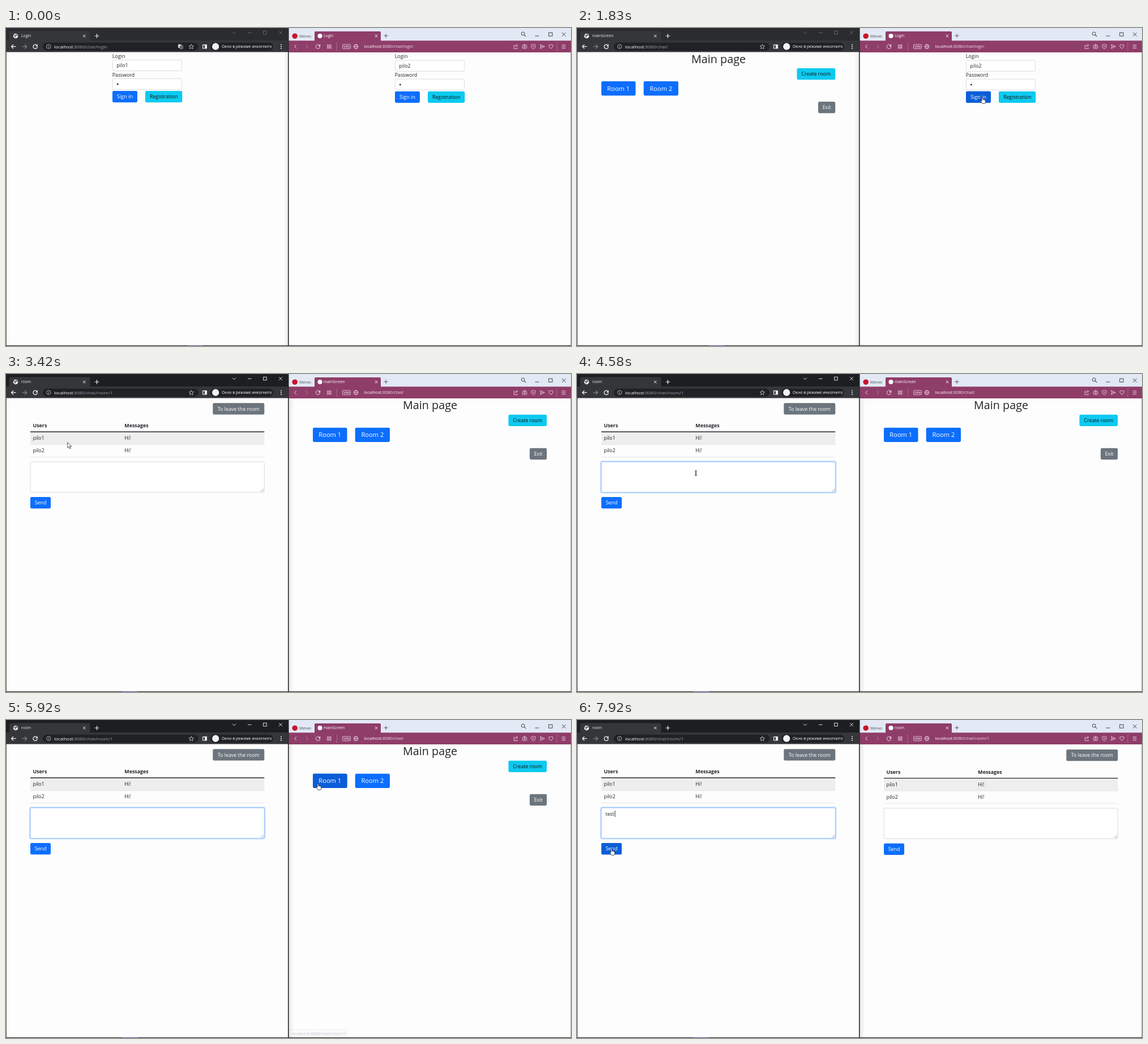
Animation, 998 px wide and 561 px high, one loop 8000 ms. Source, as an HTML page:

```html
<!DOCTYPE html>
<html lang="en">
<head>
<meta charset="utf-8">
<title>Two chat windows</title>
<style>
  html, body { margin: 0; width: 100%; height: 100%; overflow: hidden; background: #fdfdfd; }
  svg { display: block; width: 998px; height: 561px; font-family: "Open Sans", "Noto Sans", sans-serif; }
  text { white-space: pre; }
</style>
</head>
<body>
<svg id="stage" viewBox="0 0 998 561"></svg>
<script>
const LOOP = 8000, STEP = 1000 / 12;
const BLUE = '#0d6efd', CYAN = '#0dcaf0', GREY = '#6c757d', INK = '#212529';
const HOVER = { [BLUE]: '#0b5ed7', [CYAN]: '#31d2f2', [GREY]: '#5c636a' };
const stage = document.getElementById('stage');

// ---- drawing helpers
const rect = (x, y, w, h, fill, r = 0, more = '') =>
  `<rect x="${x}" y="${y}" width="${w}" height="${h}" rx="${r}" fill="${fill}" ${more}/>`;
const text = (x, mid, str, size, fill, more = '') =>
  `<text x="${x}" y="${mid + size * .36}" font-size="${size}" fill="${fill}" ${more}>${str}</text>`;
const line = (d, color, w = 1, more = '') =>
  `<path d="${d}" fill="none" stroke="${color}" stroke-width="${w}" ${more}/>`;
const disc = (x, y, r, fill, more = '') => `<circle cx="${x}" cy="${y}" r="${r}" fill="${fill}" ${more}/>`;
const at = (x, y, body) => `<g transform="translate(${x} ${y})">${body}</g>`;
const cross = (x, y, r, c, w = 1) =>
  line(`M${x - r} ${y - r}l${2 * r} ${2 * r}M${x - r} ${y + r}l${2 * r} ${-2 * r}`, c, w);
const plus = (x, y, r, c, w = 1.2) => line(`M${x - r} ${y}h${2 * r}M${x} ${y - r}v${2 * r}`, c, w);
const arrow = (x, y, c, dir = 1) =>
  line(`M${x - 4 * dir} ${y}h${8 * dir}m${-3.5 * dir} -3.5l${3.5 * dir} 3.5l${-3.5 * dir} 3.5`, c, 1.3);
const reload = (x, y, c, w = 1.3) =>
  line(`M${x + 2.6} ${y - 2.6}A3.7 3.7 0 1 0 ${x + 3.7} ${y + .6}`, c, w) +
  `<path d="M${x + 4.2} ${y - 4.2}v4h-4z" fill="${c}"/>`;
const globe = (x, y, r, c) => disc(x, y, r, 'none', `stroke="${c}" stroke-width=".8"`) +
  line(`M${x - r} ${y}h${2 * r}M${x} ${y - r}q${-r} ${r} 0 ${2 * r}q${r} ${-r} 0 ${-2 * r}`, c, .7);

// ---- what happens when
const WINDOWS = {
  L: { ox: 0, oy: 0, user: 'pilo1', main: 1250, room: 3250, press: [830, 2900] },
  R: { ox: 499, oy: .7, user: 'pilo2', main: 2330, room: 6250, press: [1990, 5990] }
};
const KEYS = [7080, 7240, 7330, 7410];
const TRACK = [[0, 335, 575], [80, 335, 575], [660, 222, 115], [1250, 222, 115], [1740, 716, 122],
  [2150, 716, 122], [2500, 165, 112], [2640, 122, 110], [2665, 89, 110], [3250, 89, 110],
  [3900, 210, 175], [5080, 210, 175], [5800, 551, 112], [6250, 551, 112],
  [6640, 311, 184], [7240, 311, 184], [7740, 61, 227], [8000, 61, 227]];

const activeAt = t => t < 750 ? '' : t < 1790 ? 'L' : t < 2700 ? 'R' : t < 5960 ? 'L' : t < 6600 ? 'R' : 'L';
const pageAt = (win, t) => t < win.main ? 'login' : t < win.room ? 'main' : 'room';
const loadingAt = (win, t) =>
  t >= win.press[0] && t < win.main || t >= win.press[1] && t < win.room;
const pathAt = (win, t) =>
  t < win.press[0] ? '/chat/login' : t < win.press[1] ? '/chat/' : '/chat/room/1';

function pointerAt(t) {
  const i = Math.max(1, TRACK.findIndex(k => k[0] > t));
  const [t0, x0, y0] = TRACK[i - 1], [t1, x1, y1] = TRACK[i];
  const p = Math.max(0, (t - t0) / (t1 - t0)), e = p * p * (3 - 2 * p);
  return [x0 + (x1 - x0) * e, y0 + (y1 - y0) * e];
}

// x, y, width, height, label, colour, text size
const BUTTONS = {
  login: [[188, 111, 44, 20.3, 'Sign in', BLUE, 9], [246, 111, 65.3, 20.3, 'Registration', CYAN, 8.9]],
  main: [[388.5, 71, 67.7, 20.3, 'Create room', CYAN, 8.9], [43, 94, 60.5, 25.3, 'Room 1', BLUE, 11.1],
    [117.7, 94, 61.3, 25.3, 'Room 2', BLUE, 11.1], [426, 130, 30.2, 20.3, 'Exit', GREY, 8.8]],
  room: [[365.3, 51.3, 91, 20.3, 'To leave the room', GREY, 8.9], [43, 217, 36, 20.3, 'Send', BLUE, 8.9]]
};
const FIELDS = {
  login: [[188, 56, 123, 20], [188, 89, 123, 20]], main: [], room: [[43, 155, 413, 54]]
};

function inside([x, y, w, h], win, t) {
  const [px, py] = pointerAt(t), dx = px - win.ox - x, dy = py - win.oy - y;
  return dx >= 0 && dy >= 0 && dx <= w && dy <= h;
}

// Hover colour fades over 150 ms.
function hoverMix(box, win, t) {
  let sum = 0;
  for (let i = 0; i < 8; i++) sum += inside(box, win, t - i * 20);
  return sum / 8;
}

// ---- pages
function button(box, win, t) {
  const [x, y, w, h, label, color, size] = box;
  const focus = label === 'Sign in' && loadingAt(win, t);
  const ring = focus ? rect(x - 2, y - 2, w + 4, h + 4, BLUE, 4, 'opacity=".45"') : '';
  const mix = focus ? 1 : hoverMix(box, win, t);
  return ring + rect(x, y, w, h, color, 2.4) +
    rect(x, y, w, h, HOVER[color], 2.4, `opacity="${mix}"`) +
    text(x + w / 2, y + h / 2, label, size, color === CYAN ? '#111' : '#fff', 'text-anchor="middle"');
}

const input = ([x, y, w, h]) => rect(x + .4, y + .4, w - .8, h - .8, '#fff', 2.4, 'stroke="#ced4da" stroke-width=".8"');

const CONTENT = {
  login: win => text(187.7, 49.5, 'Login', 9, INK) + text(187.7, 82.5, 'Password', 8.8, INK) +
    FIELDS.login.map(input).join('') + text(195.3, 66, win.user, 8.8, INK) + disc(197.3, 99.2, 1.4, INK),

  main: () => text(250, 54.5, 'Main page', 19.8, INK, 'text-anchor="middle" font-weight="500"'),

  room(win, t) {
    const focused = win === WINDOWS.L && t >= 4000;
    const typed = focused ? 'test'.slice(0, KEYS.filter(k => t >= k).length) : '';
    const since = [4000, 6600, ...KEYS].filter(k => t >= k).pop();
    const caret = focused && activeAt(t) === 'L' && (t - since) % 1060 < 530;
    const row = (mid, who) => text(47.5, mid, who, 8.8, INK) + text(209.3, mid, 'Hi!', 8.8, INK);
    return text(47.5, 91, 'Users', 8.9, INK, 'font-weight="700"') +
      text(209.3, 91, 'Messages', 8.9, INK, 'font-weight="700"') +
      rect(43, 102, 413.3, 22, '#eeeeef') + row(113.3, WINDOWS.L.user) + row(135.3, WINDOWS.R.user) +
      line('M43 102h413.3', INK, 1.3) + line('M43 124.5h413.3M43 146.5h413.3', '#dee2e6', .8) +
      (focused ? rect(41, 153, 417.3, 57.5, '#bfdaff', 4) : '') +
      rect(43, 155, 413.3, 53.7, '#fff', 2.4, `stroke="${focused ? '#86b7fe' : '#ced4da'}" stroke-width=".8"`) +
      line('M450 207.5l5 -5M453 207.5l2 -2', '#777', .7) +
      (typed ? `<text x="50.3" y="168.5" font-size="8.8" fill="${INK}">${typed}</text>` : '') +
      (caret ? rect(50.4 + (typed ? 16.2 * typed.length / 4 : 0), 160, .9, 11, '#111') : '');
  }
};

function page(win, t) {
  const name = pageAt(win, t);
  return at(win.ox, win.oy, CONTENT[name](win, t) + BUTTONS[name].map(b => button(b, win, t)).join(''));
}

function address(x, win, t, size, dim) {
  return text(x, 32.7, `localhost<tspan fill="${dim}">:8080${pathAt(win, t)}</tspan>`, size, '#fff');
}

const TITLES = { login: 'Login', main: 'mainScreen', room: 'room' };
const titleAt = (win, t) => loadingAt(win, t) ? 'localhost:8080' + pathAt(win, t) : TITLES[pageAt(win, t)];

// ---- window frames
function darkFrame(t) {
  const win = WINDOWS.L, on = activeAt(t) === 'L', busy = loadingAt(win, t);
  const ctl = on ? '#f1f1f1' : '#686a6d', w = '#f1f3f4';
  const tabIcon = busy ? line('M14 11a3 3 0 0 1 3 -1', '#8a8c90', .8)
    : disc(17, 14, 4.3, w) + line('M13.5 12.5l3 1.2l-.6 3M18 10.5l-.6 2l3 .6', '#35363a', 1.3);
  const translate = pageAt(win, t) === 'login' && !busy
    ? rect(304, 28.8, 5.5, 6, '#d5d7da', .6) + rect(307, 31, 5.2, 5.6, '#202124', .6, 'stroke="#d5d7da" stroke-width=".8"') +
      line('M308.3 35.3l1.4 -3l1.4 3', '#d5d7da', .7) : '';
  return rect(0, 0, 499, 22.5, on ? '#1d1e21' : '#2b2c2f') +
    `<path d="M3 22.5q2.5 0 2.5 -3v-11q0 -3 3 -3h137q3 0 3 3v11q0 3 2.5 3z" fill="#35363a"/>` +
    rect(0, 22, 499, 20.5, '#35363a') + tabIcon +
    text(27, 14, titleAt(win, t), 6.8, '#eee') + cross(138.3, 14, 2.2, w) + plus(160.5, 14, 3.8, w) +
    line('M400 6.8l3 3l3 -3M427 8.3h6.5', ctl, .9) +
    rect(454.6, 5.3, 5.6, 5.6, 'none', 0, `stroke="${ctl}" stroke-width=".9"`) + cross(485, 8.2, 3, ctl, .9) +
    arrow(13.5, 32.7, w, -1) + arrow(32.7, 32.7, '#7d8084') +
    (busy ? cross(52, 32.7, 3.2, w, 1.4) : reload(51.7, 32.7, w)) +
    rect(65, 25.7, 275, 14.2, '#202124', 7.1) +
    disc(75.3, 32.7, 3.7, 'none', 'stroke="#bdc1c6" stroke-width=".9"') + line('M75.3 32.2v2.6M75.3 30.6v.9', '#bdc1c6', .9) +
    address(85, win, t, 8, '#9aa0a6') + translate +
    line('M327.3 28.7l1.2 2.8l3 .2l-2.3 2l.8 3l-2.7 -1.7l-2.7 1.7l.8 -3l-2.3 -2l3 -.2z', '#d5d7da', .8) +
    rect(347.6, 29.6, 6.8, 6.4, 'none', .6, `stroke="${w}" stroke-width="1.2"`) + rect(351, 29.6, 3.6, 6.4, w) +
    rect(361, 25.7, 111, 14.2, '#202124', 7.1) + disc(370.2, 32.7, 6.1, w) +
    text(381, 32.5, 'Окно в режиме инкогнито', 6.9, '#fff') +
    [29.6, 32.8, 36].map(y => disc(486, y, 1, w)).join('');
}

function lightFrame(t) {
  const win = WINDOWS.R, ctl = '#3c4248', w = '#f0dfe9', dim = '#b889a3';
  return rect(499, 0, 499, 22.5, '#e3e9f4') + disc(510.2, 14.2, 4.8, '#c8142c') +
    text(518, 14.3, 'Меню', 7.2, '#555b66') +
    `<path d="M545 23v-15q0 -2 2 -2h113q2 0 2 2v15z" fill="#8f3d69"/>` +
    rect(499, 22.3, 499, 20.7, '#8f3d69') + disc(554.5, 14, 4, '#fff') +
    text(561, 14, titleAt(win, t), 6.8, '#fff') + cross(654, 14, 2.4, w) + plus(671, 13.7, 3.5, '#555b66', 1) +
    disc(913.2, 10, 2.9, 'none', `stroke="${ctl}" stroke-width="1"`) + line('M915.3 12.2l3 3', ctl, 1.1) +
    line('M934.5 14h7', ctl, 1) + rect(958.7, 8.2, 6.3, 6, 'none', 0, `stroke="${ctl}" stroke-width="1"`) +
    cross(985.3, 11.3, 3.3, ctl, 1) +
    line('M513 29.3l-3.4 3.4l3.4 3.4', w) + line('M529.5 29.3l3.4 3.4l-3.4 3.4', dim) +
    (loadingAt(win, t) ? cross(551, 32.7, 3, w, 1.1) : reload(551, 32.7, w, 1)) +
    [567.5, 571.6].map(x => [29.6, 33.5].map(y => rect(x, y, 2.6, 2.5, 'none', .3, `stroke="${w}" stroke-width=".8"`)).join('')).join('') +
    line('M584.3 25.5v15M973 25.5v15', '#b27797', .8) +
    rect(594.5, 29, 14, 7.6, 'none', 1.2, `stroke="${w}" stroke-width=".8"`) +
    text(601.5, 32.8, 'VPN', 5.4, w, 'text-anchor="middle" font-weight="600"') + globe(618, 32.7, 3.9, w) +
    address(632.5, win, t, 7.4, '#f0dfe9') +
    line('M899.5 30.5h-2.3v6h6v-2.3M899.5 34q.3 -3.5 4 -3.6M901.5 28.5l2.3 1.9l-2.3 1.9', w, .8) +
    rect(912.2, 30.3, 7.6, 5.8, 'none', 1, `stroke="${w}" stroke-width=".8"`) + disc(916, 33.2, 1.5, 'none', `stroke="${w}" stroke-width=".8"`) +
    line('M914.7 30l.5 -1.2h1.6l.5 1.2', w, .8) +
    line('M931.5 28.7l3.6 1v3.5q-.5 2.5 -3.6 3.8q-3.1 -1.3 -3.6 -3.8v-3.5z', w, .8) + cross(931.5, 32.6, 1.3, w, .8) +
    line('M943.5 29.2l8 3.5l-8 3.5l1.3 -3.5zM944.8 32.7h4', w, .8) +
    line('M962.5 36.5l-3.2 -3.4q-1.6 -2.5 .6 -3.7q1.7 -.5 2.6 1.2q.9 -1.7 2.6 -1.2q2.2 1.2 .6 3.7z', w, .9) +
    line('M981.7 30h6.6M981.7 32.8h6.6M981.7 35.6h6.6', w, .9);
}

function linkHint(t) {
  if (t < 5800 || t >= WINDOWS.R.room) return '';
  return `<g opacity="${t < 5950 ? .5 : 1}">` +
    rect(499.5, 546.5, 103, 14, '#fafafc', 1, 'stroke="#d5d6e2" stroke-width=".8"') +
    text(505, 553.5, 'localhost:8080/chat/room/1', 7.4, '#8d8f96') + '</g>';
}

function edges(t) {
  const on = activeAt(t), mark = on === 'L' ? 205 : on === 'R' ? 233 : 320;
  const shade = on === 'L' ? [499, 'M'] : [490, 'm'];
  const steps = [...Array(9).keys()].map(i =>
    rect(shade[0] + i, 43, 1, 517, '#000', 0, `opacity="${.009 * (on === 'L' ? 9 - i : i + 1)}"`)).join('');
  return steps + rect(0, 42, .8, 519, '#333') + rect(498, 0, 1.6, 561, '#2a2a2c') +
    rect(997.4, 43, .6, 518, '#777') + rect(0, 559.8, 998, 1.2, '#333') + rect(mark, 560, 28, 1, '#6a59a8');
}

// ---- pointer
const SHAPES = {
  arrow: `<path d="M0 0v9.6l2.3 -2.1l1.6 3.6l1.6 -.7l-1.6 -3.5h3.2z" fill="#fff" stroke="#111" stroke-width=".7"/>`,
  hand: `<path d="M-1 1q0 -1.2 1 -1.2t1 1.2v3.4l.3 -.2q1.2 -.6 1.6 .5q1.2 -.5 1.6 .6q1.2 -.2 1.2 1v2.5q0 1.6 -1 2.6h-4.6l-2.9 -4q-.7 -1.2 .4 -1.4l1.4 .9z" fill="#fff" stroke="#111" stroke-width=".75"/>`,
  beam: line('M-2 -4.5q2 0 2 1.2v6.6q0 1.2 -2 1.2M2 -4.5q-2 0 -2 1.2v6.6q0 1.2 2 1.2', '#222', .9)
};

function pointer(t) {
  const [x, y] = pointerAt(t), win = x < 499 ? WINDOWS.L : WINDOWS.R, name = pageAt(win, t);
  const over = list => list.some(b => inside(b, win, t));
  const kind = loadingAt(win, t) ? 'arrow' : over(BUTTONS[name]) ? 'hand' : over(FIELDS[name]) ? 'beam' : 'arrow';
  return at(x, y, SHAPES[kind]);
}

function draw(t) {
  stage.innerHTML = rect(0, 0, 998, 561, '#fdfdfd') + page(WINDOWS.L, t) + page(WINDOWS.R, t) +
    darkFrame(t) + lightFrame(t) + linkHint(t) + edges(t) + pointer(t);
}

const start = performance.now();
let shown = -1;
function tick() {
  const step = Math.floor(((performance.now() - start) % LOOP + 4) / STEP) % 96;
  if (step !== shown) draw((shown = step) * STEP);
  requestAnimationFrame(tick);
}
tick();
</script>
</body>
</html>
```
